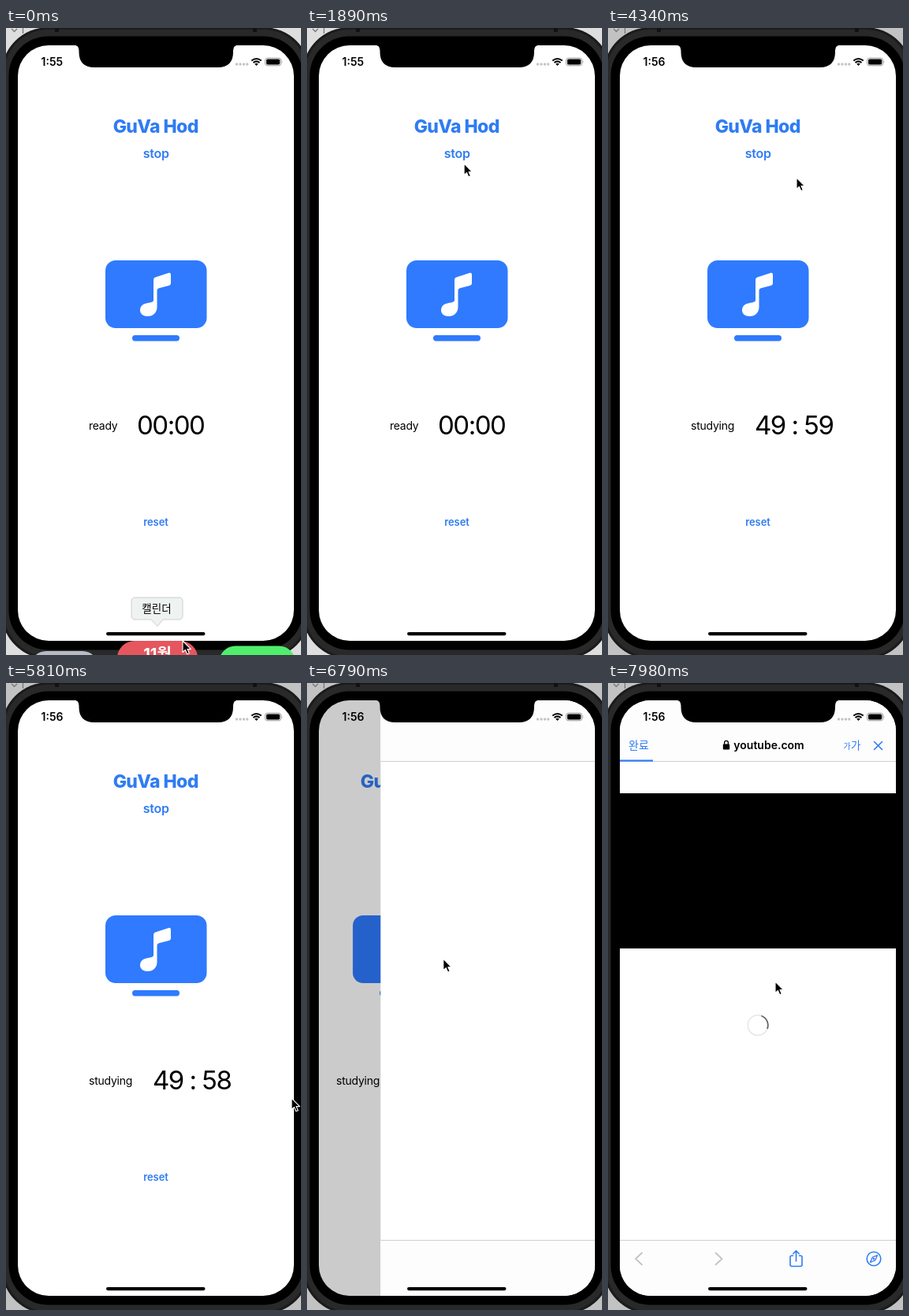
An HTML page for the animation above (8 s loop, 374x796 px).

```html
<!DOCTYPE html>
<html lang="ko">
<head>
<meta charset="utf-8">
<title>Study timer</title>
<style>
html, body { margin: 0; width: 100%; height: 100%; overflow: hidden; background: #ddd; }
svg { display: block; width: 100vw; height: 100vh; }
text { font-family: Inter, "Noto Sans CJK KR", "Noto Sans CJK", sans-serif; }
.blue { fill: #2f7cf3; }
.line { fill: none; stroke: #2f7cf3; stroke-width: 1.6; stroke-linecap: round; stroke-linejoin: round; }
.mid { text-anchor: middle; }
.semi { font-weight: 600; }
</style>
</head>
<body>
<svg viewBox="0 0 374 796" xmlns="http://www.w3.org/2000/svg">
  <defs>
    <clipPath id="screen"><rect x="15" y="22" width="350" height="756" rx="39"/></clipPath>
  </defs>

  <rect id="desk" width="374" height="796"/>
  <path d="M7 1l3.5 3.5L14 1M21.500 0v7" fill="none" stroke="#777" stroke-width="1.300"/>

  <!-- phone body -->
  <rect x="-6" y="-1" width="392" height="802" rx="60" fill="#1b1b1c"/>
  <rect x="-3" y="2" width="386" height="796" rx="57" fill="#29292a"/>
  <rect x="3.500" y="10.500" width="373" height="779" rx="50" fill="#000"/>
  <path d="M62 0h5v5h-5zM313 0h5v5h-5z" fill="#111"/>

  <g clip-path="url(#screen)">
    <rect x="15" y="22" width="350" height="756" fill="#fff"/>
    <g id="home">
      <text class="blue mid" x="189.700" y="132.500" font-size="23" font-weight="800" letter-spacing="-.6">GuVa Hod</text>
      <text class="blue mid semi" x="190.200" y="165" font-size="16" letter-spacing="-.3">stop</text>
      <rect x="126" y="295" width="128.500" height="86" rx="13" fill="#2f7aff"/>
      <rect x="160" y="390" width="60" height="7.500" rx="3.700" fill="#2f7aff"/>
      <path fill="#fff" d="M187 346V320q0-3 3-3.800L206 311q3-.7 3 2.300V324q0 2.400-2.400 3L194 330.300q-2.500.6-2.500 3V354c0 7.500-5 12-12 12c-5.500 0-9.500-3-9.500-7.500c0-6 4-8.300 9-9.300l5-1q3-.6 3-2.200z"/>
      <text id="label" x="105" y="509.500" font-size="14" letter-spacing="-.25"></text>
      <text id="clock" y="516" font-size="33" letter-spacing="-1.500"></text>
      <text class="blue mid semi" x="190" y="632" font-size="13" letter-spacing="-.1">reset</text>
    </g>
    <rect id="dim" x="15" y="22" width="350" height="756"/>

    <g id="sheet">
      <rect x="15" y="22" width="350" height="756" fill="#fff"/>
      <path d="M15 22h350v77H15zM15 708h350v70H15z" fill="#fdfdfd"/>
      <path d="M15 99.500h350M15 707.500h350" stroke="#d0d0d2"/>
      <g id="tools">
        <text class="blue" x="26" y="83.500" font-size="14">완료</text>
        <text class="mid semi" x="204" y="84" font-size="14">youtube.com</text>
        <g id="reader">
          <text x="298.500" y="83.500" font-size="10">가</text>
          <text x="308" y="83.500" font-size="13.500">가</text>
        </g>
        <path class="line" d="M337.500 74.500l10 10M347.500 74.500l-10 10"/>
        <path class="line" style="stroke:#c3c3c6;stroke-width:1.800" d="M43 723.500l-8 7.500l8 7.500M136.500 723.500l8 7.500l-8 7.500"/>
        <path class="line" d="M234.500 727h-1.500q-2 0-2 2v9.500q0 2 2 2h11q2 0 2-2V729q0-2-2-2h-1.500M238.500 734V721M234.800 724.500l3.700-3.700l3.700 3.700"/>
        <circle class="line" cx="337" cy="731" r="8.800"/>
        <path class="line" style="stroke-width:1.300" d="M341.500 726.500l-2.700 6.300l-6.300 2.700l2.700-6.300z"/>
        <circle class="blue" cx="337" cy="731" r="1.300"/>
      </g>
      <g id="lock">
        <rect x="145.800" y="77.500" width="8.400" height="7" rx="1.300"/>
        <path d="M147.600 78v-2.200a2.400 2.400 0 0 1 4.800 0V78" fill="none" stroke="#000" stroke-width="1.300"/>
      </g>
      <rect id="bar" class="blue" x="15" y="97.500" height="2.200"/>
      <rect id="video" x="15" y="140" width="350" height="197"/>
      <g id="spin" fill="none">
        <circle cx="190" cy="434.500" r="12.800" stroke="#e3e3e3" stroke-width="1.300"/>
        <path id="arc" d="M194.400 422.500A12.800 12.800 0 0 1 202 439" stroke="#666" stroke-width="1.800"/>
      </g>
    </g>

    <!-- status bar -->
    <text id="now" class="semi" x="44.500" y="48" font-size="14"></text>
    <g fill="#c4c4c6">
      <circle cx="292.500" cy="46" r="1.700"/><circle cx="297" cy="46" r="1.700"/>
      <circle cx="301.500" cy="46" r="1.700"/><circle cx="305.800" cy="46" r="1.700"/>
    </g>
    <path d="M311.300 41.500q6.200-5 12.400 0M313.500 44q4-3.200 8 0" fill="none" stroke="#000" stroke-width="2"/>
    <path d="M315.200 45.600q2.300-1.800 4.600 0L317.500 48z"/>
    <rect x="328.600" y="38.200" width="20" height="9.600" rx="2.800" fill="none" stroke="#999"/>
    <rect x="330" y="39.600" width="17.200" height="6.800" rx="1.600"/>
    <path d="M349.800 41.300q1.600 1.700 0 3.400z" fill="#999"/>
    <rect x="127" y="767" width="125.500" height="4.200" rx="2.100"/>
  </g>
  <path d="M85 21.500q7.500 0 7.500 7v2q0 19.500 19.500 19.500H268.500q19.500 0 19.500-19.500v-2q0-7 7.500-7z"/>

  <g id="tip">
    <path d="M164 723h55q5 0 5 5v18q0 5-5 5h-20l-7 8.500l-8-8.500h-20q-5 0-5-5v-18q0-5 5-5z" fill="#eef2f1" stroke="#cbd0cf"/>
    <text class="mid" x="191" y="742" font-size="13.500">캘린더</text>
  </g>
  <g id="dock">
    <rect x="31" y="791" width="86" height="90" rx="20" fill="#b8bbc3"/>
    <rect x="141" y="778" width="102" height="100" rx="22" fill="#e5565f"/>
    <text class="mid" x="192" y="802" font-size="20" font-weight="700" fill="#fff">11월</text>
    <rect x="270" y="784.500" width="97" height="95" rx="21" fill="#50ee6c"/>
  </g>

  <g id="press" fill="none">
    <circle r="20" stroke="#fff" stroke-width="5.500" stroke-opacity=".85"/>
    <circle r="20" stroke="#000" stroke-width="2.700"/>
  </g>
  <path id="cursor" d="M0 0V14.500L3.400 11.500L5.700 16.800L8.300 15.700L6 10.600H10.400z" stroke="#fff" stroke-width="1.100" stroke-linejoin="round"/>
</svg>

<script>
const LOOP = 8000, STEP = 70;
const el = id => document.getElementById(id);
const set = (id, name, value) => el(id).setAttribute(name, value);
const show = (id, on) => set(id, 'visibility', on ? 'inherit' : 'hidden');
const clamp = v => Math.max(0, Math.min(1, v));
const ramp = (t, a, b) => clamp((t - a) / (b - a));
const smooth = u => u * u * (3 - 2 * u);

// time, x, y of the pointer tip
const path = [
  [0, 224, 778], [350, 331, 391], [420, 336, 428], [980, 336, 428], [1050, 337, 429],
  [1540, 178, 240], [1820, 198, 174], [2310, 218, 141], [2380, 218, 141], [2660, 226, 130],
  [3010, 226, 130], [3290, 211, 128], [3430, 212, 129], [3500, 212, 129], [3850, 230, 162],
  [3990, 230, 162], [4060, 231, 163], [4130, 231, 163], [4340, 239, 190], [5250, 239, 190],
  [5810, 362, 527], [5950, 362, 527], [6440, 151, 334], [6650, 151, 334], [7000, 213, 380],
  [7630, 212, 379], [8000, 212, 379]
];

function pointer(t) {
  const i = path.findIndex(p => p[0] > t);
  const [t0, x0, y0] = path[i - 1], [t1, x1, y1] = path[i];
  const u = smooth((t - t0) / (t1 - t0));
  return [x0 + (x1 - x0) * u, y0 + (y1 - y0) * u];
}

// critically damped spring
function push(t) {
  const w = Math.max(0, t - 6610) * 0.0158;
  return t > 7070 ? 1 : 1 - (1 + w) * Math.exp(-w);
}

function draw(t) {
  const at = `translate(${pointer(t)})`;
  set('cursor', 'transform', at);
  set('press', 'transform', at);
  show('press', (t >= 2590 && t < 2870) || (t >= 6440 && t < 6600));

  set('desk', 'fill', t < 2800 ? '#dedede' : '#c2c2c2');
  show('tip', t < 70);
  set('dock', 'transform', `translate(0 ${24 * smooth(ramp(t, 0, 350))})`);
  show('dock', t < 420);

  const running = t >= 3850;
  const left = t < 4970 ? 59 : t < 6020 ? 58 : t < 7070 ? 57 : 56;
  el('now').textContent = t < 3640 ? '1:55' : '1:56';
  el('label').textContent = running ? 'studying' : 'ready';
  el('clock').textContent = running ? `49 : ${left}` : '00:00';
  set('clock', 'x', running ? 186 : 166);

  const p = push(t);
  set('home', 'transform', `translate(${-87.5 * p} 0)`);
  set('dim', 'fill-opacity', 0.25 * Math.pow(p, 0.82));
  set('sheet', 'transform', `translate(${350 * (1 - p)} 0)`);
  show('sheet', p > 0);

  set('tools', 'opacity', ramp(t, 7070, 7280));
  set('reader', 'fill', t < 7700 ? '#c3c3c6' : '#2f7cf3');
  show('lock', t >= 7700);
  set('bar', 'width', 42 * smooth(ramp(t, 7210, 7560)));
  show('video', t >= 7770);
  show('spin', t >= 7840);
  set('arc', 'transform', `rotate(${(t - 7980) * 0.5} 190 434.5)`);
}

function tick() {
  const t = performance.now() % LOOP;
  draw(Math.floor(t / STEP) * STEP);
  requestAnimationFrame(tick);
}
tick();
</script>
</body>
</html>
```
